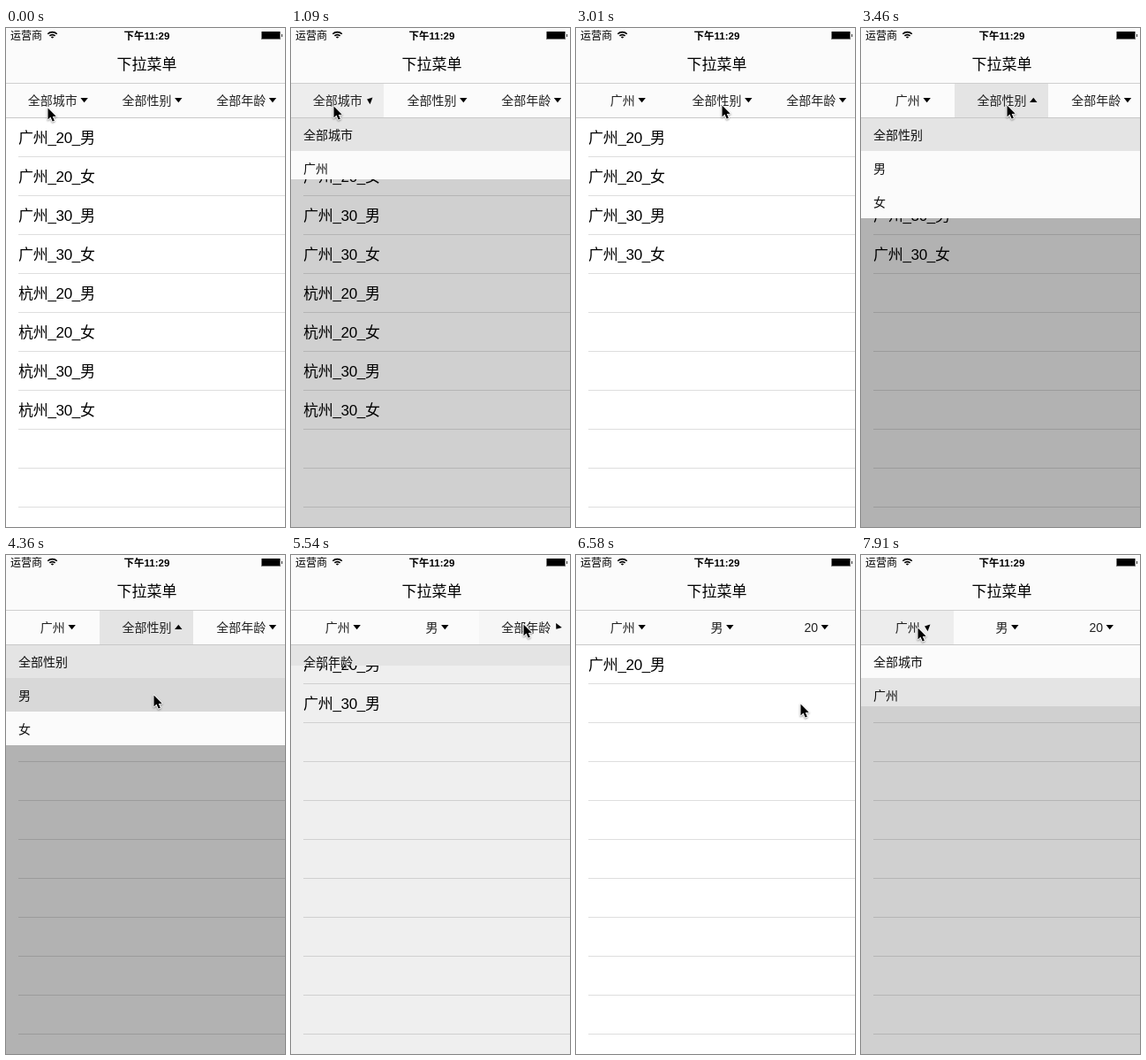
Recreate the animation shown at these times as an HTML page with a canvas. Size 316 px wide and 564 px high, loop 8 s.

```html
<!DOCTYPE html>
<html lang="zh-CN">
<head>
<meta charset="utf-8">
<title>下拉菜单</title>
<style>
  html, body { margin: 0; width: 316px; height: 564px; overflow: hidden; background: #fff; }
  canvas { display: block; }
</style>
</head>
<body>
<canvas id="stage" width="316" height="564"></canvas>
<script>
const W = 316, H = 564, LOOP = 8000, TICK = 148.2, PHASE = 490;
const TOP = 101, ROW = 38, LINE = 44, TAB = 320 / 3, SLIDE = 200;
const FAMILY = '"Liberation Sans", "Noto Sans CJK SC", "Noto Sans CJK", sans-serif';
const ctx = document.getElementById('stage').getContext('2d');

const menus = [
  ['全部城市', '广州', '杭州'],
  ['全部性别', '男', '女'],
  ['全部年龄', '20', '30']
];

const people = [];
for (const city of ['广州', '杭州'])
  for (const age of ['20', '30'])
    for (const sex of ['男', '女']) people.push([city, sex, age]);

// Each visit: the pointer reaches a tab, opens its menu, then picks the second row.
const visits = [
  { tab: 0, open: 960, pick: 2110, tabAt: [48, 88], rowAt: [56, 161] },
  { tab: 1, open: 3200, pick: 4335, tabAt: [165, 87], rowAt: [167, 158] },
  { tab: 2, open: 5487, pick: 6300, tabAt: [263, 78], rowAt: [254, 168] },
  { tab: 0, open: 7778, pick: Infinity, tabAt: [64, 82], rowAt: [64, 161] }
];

const gray = v => `rgb(${v},${v},${v})`;
const ramp = (t, from, to) => Math.max(0, Math.min(1, (t - from) / (to - from)));
const ease = u => u * u * (3 - 2 * u);
const releaseOf = v => v.pick + 50;

function rect(x, y, w, h, color) {
  ctx.fillStyle = color;
  ctx.fillRect(x, y, w, h);
}

function text(str, x, y, size, { align = 'left', weight = 400, color = '#000', spacing = 0 } = {}) {
  ctx.font = `${weight} ${size}px ${FAMILY}`;
  ctx.letterSpacing = spacing + 'px';
  ctx.textAlign = align;
  ctx.fillStyle = color;
  ctx.fillText(str, x, y);
  return ctx.measureText(str).width;
}

function polygon(points) {
  ctx.beginPath();
  points.forEach(([x, y]) => ctx.lineTo(x, y));
  ctx.closePath();
}

function cursorAt(t) {
  let pos = [47, 90], leave = 400;
  const go = (to, from, until) => {
    const e = ease(ramp(t, from, until));
    pos = pos.map((v, i) => v + (to[i] - v) * e);
  };
  for (const v of visits) {
    go(v.tabAt, leave, v.open - 220);
    go(v.rowAt, v.open + 360, v.open + 760);
    leave = v.pick + 400;
    if (t < leave) break;
  }
  return pos;
}

function drawStatus() {
  rect(0, 0, W, 62, '#fbfbfb');
  text('运营商', 5, 12.5, 12);
  text('下午11:29', 159.5, 12.5, 11.5, { align: 'center', weight: 'bold' });
  ctx.strokeStyle = '#000';
  ctx.lineWidth = 1.7;
  for (const r of [1.5, 4.4, 7.4]) {
    ctx.beginPath();
    ctx.arc(52.5, 12, r, -Math.PI * .75, -Math.PI * .25);
    ctx.stroke();
  }
  rect(289, 4, 22, 9, '#777');
  rect(290, 4, 20, 8, '#000');
  rect(312, 7, 1, 3, '#333');
  text('下拉菜单', 159.5, 46.5, 17, { align: 'center', weight: 500 });
}

function drawList(filters) {
  rect(0, TOP, W, H - TOP, '#fff');
  people
    .filter(p => p.every((v, i) => !filters[i] || v === menus[i][1]))
    .forEach(([city, sex, age], i) =>
      text(`${city}_${age}_${sex}`, 14, 130 + LINE * i, 17, { spacing: -.3 }));
  for (let y = TOP + LINE; y < H; y += LINE) rect(14, y, W - 14, 1, '#dedede');
}

function drawMenu(titles, tab, open, pressed) {
  if (!open) return;
  rect(0, TOP, W, H - TOP, `rgba(0,0,0,${.3 * open})`);
  const bottom = Math.round(TOP + 3 * ROW * open);
  menus[tab].forEach((name, i) => {
    const y = TOP + ROW * i;
    if (y >= bottom) return;
    const shade = pressed && i === 1 ? 216 : i === titles[tab] ? 228 : 251;
    rect(0, y, W, Math.min(ROW, bottom - y), gray(shade));
    text(name, 14, y + 24.5, 14, { color: '#111' });
  });
}

function drawTabs(titles, tab, open) {
  rect(0, 62, W, 39, '#fbfbfb');
  menus.forEach((names, i) => {
    const p = i === tab ? open : 0, mid = TAB * (i + .5) - .5;
    if (p) rect(Math.round(TAB * i - .6), 63, 106, 38, gray(Math.round(251 - 23 * p)));
    const w = text(names[titles[i]], mid, 87, 14, { align: 'center', color: '#222' });
    ctx.save();
    ctx.translate(mid + w / 2 + 7.8, 81.5);
    ctx.rotate(p * Math.PI);
    polygon([[-4.2, -2.5], [4.2, -2.5], [0, 2.7]]);
    ctx.fillStyle = '#000';
    ctx.fill();
    ctx.restore();
  });
  rect(0, 62, W, 1, '#cfcfcf');
  rect(0, 101, W, 1, '#c8c8c8');
}

function drawCursor(x, y) {
  ctx.save();
  ctx.translate(x + .5, y + .5);
  ctx.scale(.92, .92);
  polygon([[0, 0], [0, 14], [3.2, 11], [5.6, 16.4], [8, 15.4], [5.7, 10.2], [10, 10]]);
  ctx.lineJoin = 'round';
  ctx.lineWidth = 2;
  ctx.strokeStyle = '#fff';
  ctx.shadowColor = 'rgba(0,0,0,.4)';
  ctx.shadowBlur = 2;
  ctx.shadowOffsetY = 1;
  ctx.stroke();
  ctx.shadowColor = 'transparent';
  ctx.fillStyle = '#000';
  ctx.fill();
  ctx.restore();
}

function frame(now) {
  // The picture is refreshed at a fixed low rate.
  const t = PHASE + Math.floor((now % LOOP - PHASE) / TICK) * TICK;
  const visit = visits.filter(v => v.open <= t).pop() || visits[0];
  const release = releaseOf(visit);
  const open = ramp(t, visit.open, visit.open + SLIDE) * (1 - ramp(t - release, 0, SLIDE));
  const pressed = t >= visit.pick && t < release;
  const filters = menus.map((_, i) => t >= visits[i].pick ? 1 : 0);
  const titles = menus.map((_, i) => t >= releaseOf(visits[i]) ? 1 : 0);
  drawStatus();
  drawList(filters);
  drawMenu(titles, visit.tab, open, pressed);
  drawTabs(titles, visit.tab, open);
  drawCursor(...cursorAt(t));
  requestAnimationFrame(frame);
}
requestAnimationFrame(frame);
</script>
</body>
</html>
```
